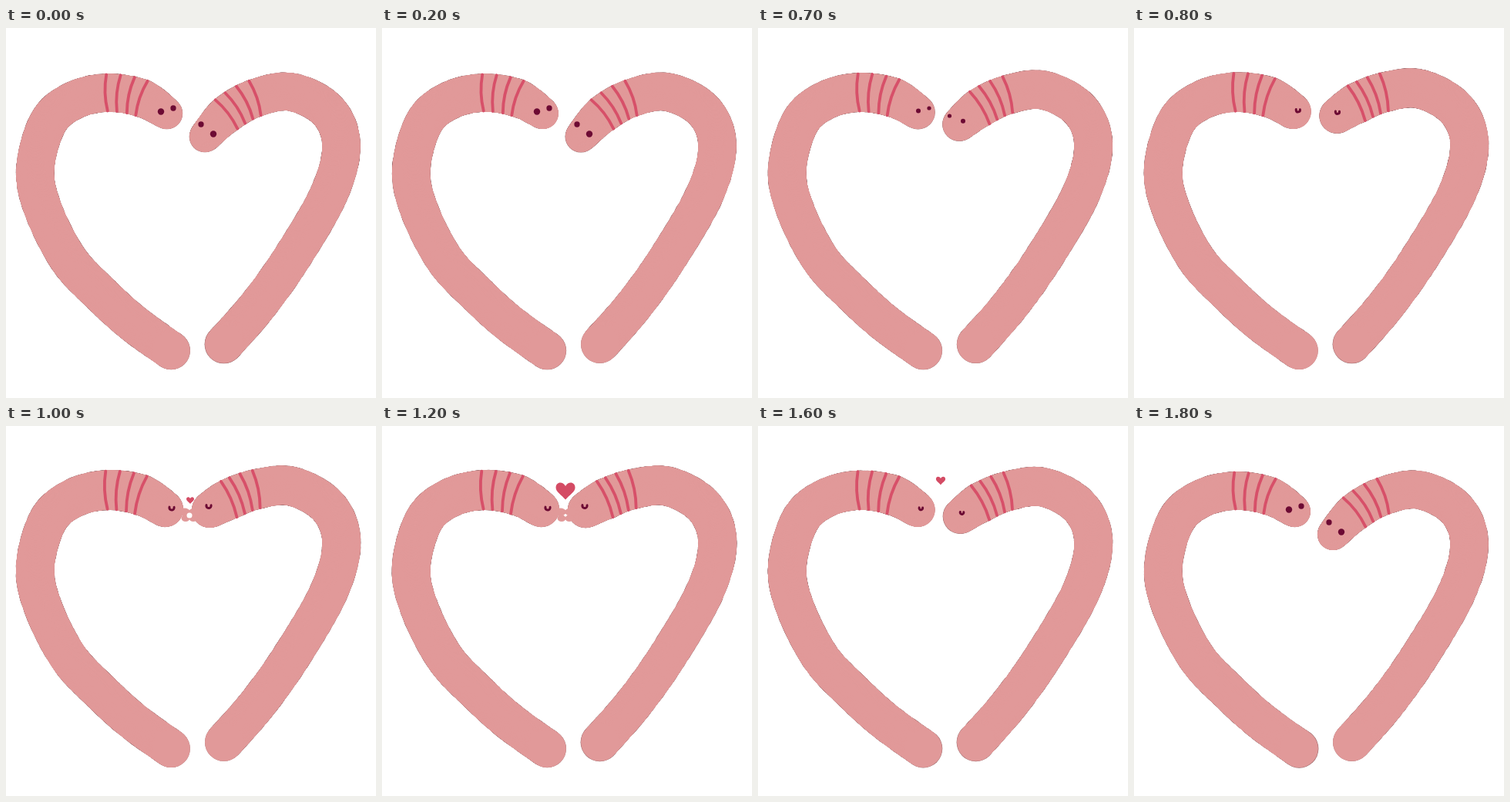
These frames come from a looping animation (480x480 px, 1900 ms). An HTML page with a canvas:

```html
<!DOCTYPE html>
<html lang="en">
<head>
<meta charset="utf-8">
<style>
  html, body { margin: 0; width: 100%; height: 100%; overflow: hidden; background: #fff; }
  canvas { display: block; }
</style>
</head>
<body>
<canvas id="stage" width="480" height="480"></canvas>
<script>
const ctx = document.getElementById('stage').getContext('2d');
const BODY = '#e19999', EDGE = '#9c6a6c', STRIPE = '#d75069', EYE = '#6c0a33', HEART = '#d44b64';
const LOOP = 1900, STEP = 100;

// Spine runs from head to tail; lift moves the head into the kiss.
// Each eye is [resting place, kissing place].
const worms = [
  {
    spine: [[209, 111], [176, 91], [131, 84], [88, 94], [55, 122], [38, 182], [48, 235],
            [81, 300], [123, 345], [165, 383], [215, 419]],
    lift: [-2, -3],
    near: [[201, 108.5], [215, 106.5]],
    far: [[217, 104], [227, 104]]
  },
  {
    spine: [[258, 141], [286, 112], [323, 91], [370, 83], [417, 107], [435, 152],
            [419, 215], [371, 298], [326, 361], [282, 411]],
    lift: [6, -32],
    near: [[269, 137.5], [263, 104]],
    far: [[253, 125], [244, 103]]
  }
];

const lerp = (a, b, k) => a + (b - a) * k;
const mix = ([a, b], k) => [lerp(a[0], b[0], k), lerp(a[1], b[1], k)];
const ramp = (t, from, to) => Math.min(1, Math.max(0, (t - from) / (to - from)));
const smooth = u => u * u * (3 - 2 * u);

function randomizer(seed) {
  return () => {
    seed = (seed * 16807) % 2147483647;
    return seed / 2147483647;
  };
}

// Catmull-Rom point at parameter u, with its unit tangent.
function pointAt(spine, u) {
  const last = spine.length - 1;
  const i = Math.min(Math.floor(u), last - 1), f = u - i;
  const at = n => spine[Math.min(last, Math.max(0, n))];
  const [a, b, c, d] = [at(i - 1), at(i), at(i + 1), at(i + 2)];
  const pos = [], dir = [];
  for (const n of [0, 1]) {
    const m0 = (c[n] - a[n]) / 2, m1 = (d[n] - b[n]) / 2, gap = b[n] - c[n];
    const p = 2 * gap + m0 + m1, q = -3 * gap - 2 * m0 - m1;
    pos.push(((p * f + q) * f + m0) * f + b[n]);
    dir.push((3 * p * f + 2 * q) * f + m0);
  }
  const len = Math.hypot(...dir);
  return { x: pos[0], y: pos[1], tx: dir[0] / len, ty: dir[1] / len };
}

const radiusAt = (u, kiss) => 24.5 - 4.5 * Math.max(0, 1 - u) + 3 * kiss * Math.exp(-u / 2);

function ellipse(x, y, rx, ry, color) {
  ctx.fillStyle = color;
  ctx.beginPath();
  ctx.ellipse(x, y, rx, ry, 0, 0, 7);
  ctx.fill();
}

function drawBody(spine, kiss, random) {
  const discs = [];
  for (let u = 0; u <= spine.length - 1; u += .025)
    discs.push({ ...pointAt(spine, u), r: radiusAt(u, kiss) });
  for (const { x, y, r } of discs) {
    const rough = r + random() * .9 - .3;
    ellipse(x, y, rough, rough, EDGE);
  }
  for (const { x, y, r } of discs) ellipse(x, y, r, r, BODY);
}

function drawStripes(spine, kiss) {
  ctx.strokeStyle = STRIPE;
  ctx.lineWidth = 3.8;
  ctx.lineCap = 'round';
  for (let i = 0; i < 4; i++) {
    const u = 1 + i / 3, r = radiusAt(u, kiss) - 1;
    const { x, y, tx, ty } = pointAt(spine, u);
    ctx.beginPath();
    ctx.moveTo(x + ty * r, y - tx * r);
    ctx.quadraticCurveTo(x + tx * 5, y + ty * 5, x - ty * r, y + tx * r);
    ctx.stroke();
  }
}

function drawEyes({ near, far }, kiss) {
  const [x, y] = mix(near, kiss);
  if (kiss > .7) {
    ctx.strokeStyle = EYE;
    ctx.lineWidth = 3;
    ctx.beginPath();
    ctx.arc(x, y - .5, 3.1 * kiss, -.2, Math.PI + .3);
    ctx.stroke();
    return;
  }
  const r = 4.2 - 2.4 * kiss;
  ellipse(x, y, r, r, EYE);
  ellipse(...mix(far, kiss), r * .87, r * .87, EYE);
}

function drawWorm(worm, kiss, random) {
  const spine = worm.spine.map(([x, y], i) => {
    const k = kiss * .53 ** i;
    return [x + worm.lift[0] * k, y + worm.lift[1] * k];
  });
  drawBody(spine, kiss, random);
  drawStripes(spine, kiss);
  drawEyes(worm, kiss);
}

function drawLips(t) {
  for (const side of [-1, 1]) {
    ellipse(238 + side * 7, 111.5, 8, 5, BODY);
    ellipse(238 + side * 5, 119.5, 5.5, 4.5, BODY);
  }
  const gap = lerp(3.5, 1.6, ramp(t, 1000, 1200));
  ellipse(238, 116, gap, gap, '#fff');
}

function drawHeart(t) {
  const size = Math.min(5 + (t - 1000) * .0375, 12.5 - (t - 1200) * .016);
  const rise = 1 - (1 - ramp(t, 1000, 1600)) ** 1.6;
  ctx.save();
  ctx.translate(lerp(239, 237, rise), lerp(96.5, 71, rise));
  ctx.scale(size, size);
  ctx.fillStyle = HEART;
  ctx.beginPath();
  ctx.moveTo(0, -.5);
  for (const side of [1, -1]) {
    ctx.moveTo(0, -.5);
    ctx.bezierCurveTo(side * .3, -1.05, side, -.95, side, -.35);
    ctx.bezierCurveTo(side, .1, side * .4, .4, 0, .9);
  }
  ctx.fill('evenodd');
  ctx.restore();
}

function draw(now) {
  const t = Math.floor((now % LOOP) / STEP) * STEP;
  const kiss = smooth(ramp(t, 500, 900)) * (1 - smooth(ramp(t, 1500, 1800)));
  const random = randomizer(t + 7);
  ctx.fillStyle = '#fff';
  ctx.fillRect(0, 0, 480, 480);
  for (const worm of worms) drawWorm(worm, kiss, random);
  if (t >= 1000 && t <= 1400) drawLips(t);
  if (t >= 1000 && t <= 1600) drawHeart(t);
}

const start = performance.now();
function tick() {
  draw(performance.now() - start);
  requestAnimationFrame(tick);
}
tick();
</script>
</body>
</html>
```
